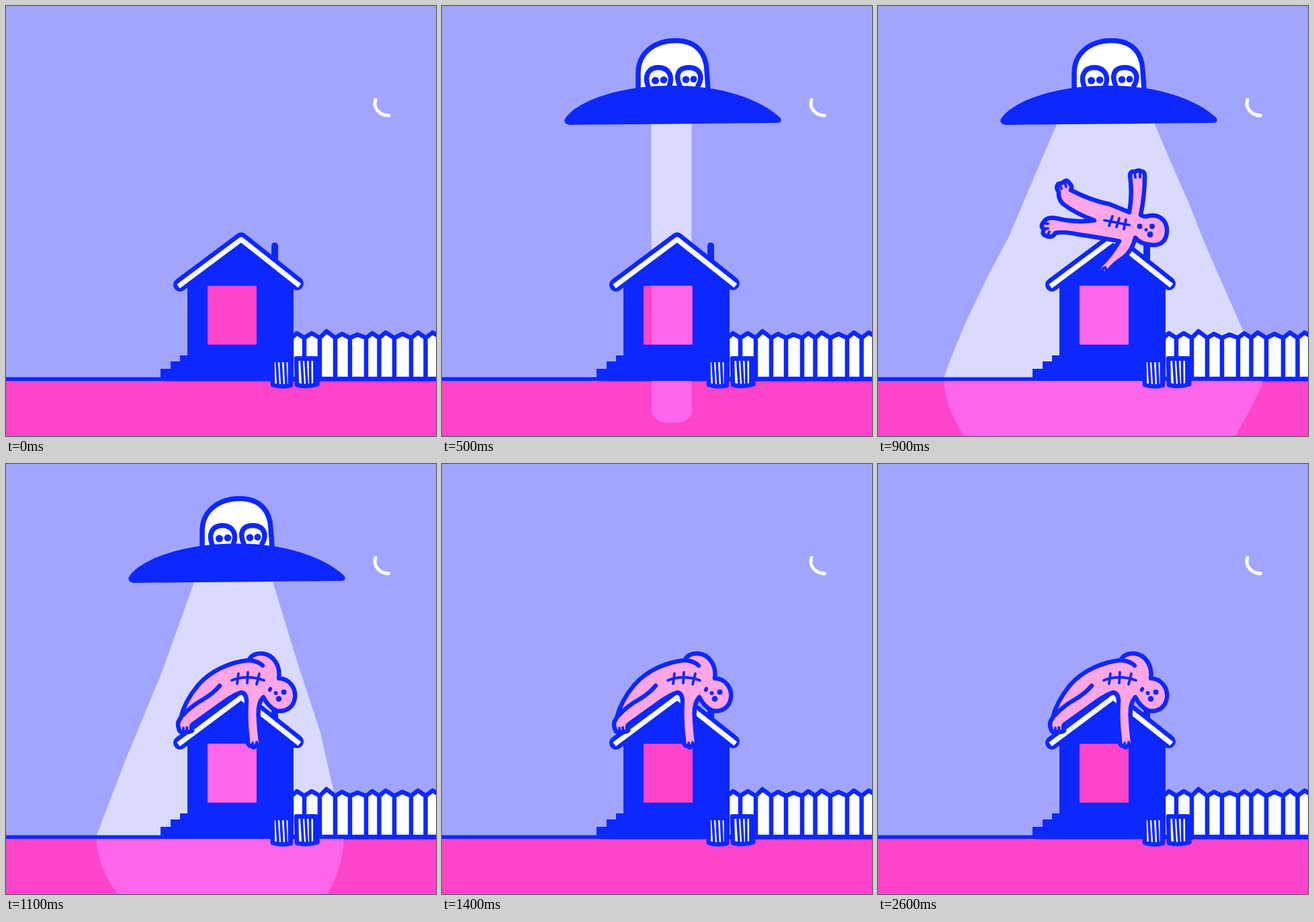
These frames come from a looping animation (640 px wide and 640 px high, 3000 ms). An HTML page:

```html
<!DOCTYPE html>
<html lang="en">
<head>
<meta charset="utf-8">
<title>Night visit</title>
<style>
  html, body { margin: 0; height: 100%; overflow: hidden; background: #a2a5ff; }
  svg { display: block; width: 100vw; height: 100vh; }
  .ink { fill: none; stroke: #0d27ff; stroke-width: 6.5; stroke-linecap: round; stroke-linejoin: round; }
  .solid { fill: #0d27ff; }
  .white { fill: #fff; }
  .skin { fill: #ffa6e6; }
  .thin { stroke-width: 3.8; }
</style>
</head>
<body>
<svg viewBox="0 0 640 640">
  <defs>
    <clipPath id="lit"><path d="M0 558H640V640H0ZM300 416.500H373V504H300Z"/></clipPath>
  </defs>
  <rect width="640" height="640" fill="#a2a5ff"/>
  <path d="M550 139.500C546 152 556 163 569.500 163" fill="none" stroke="#fff" stroke-width="5" stroke-linecap="round"/>
  <path class="beam" fill="#dadaff"/>

  <rect y="556" width="640" height="84" fill="#ff44cc"/>
  <path class="ink white" id="fence"/>
  <path class="ink" d="M-5 555.300H230L240 555.800H645" style="stroke-width:5.500"/>

  <!-- house -->
  <path class="solid" d="M270 410L350 348L428 410V558H230V540H245V529H259V520H270Z"/>
  <path class="ink thin" d="M232 555V542H247V531H261V522H272"/>
  <path class="ink" d="M400 357V378" style="stroke-width:10"/>
  <path class="ink" d="M259 415L350 347L433 413" style="stroke-width:20"/>
  <path d="M259.500 415L350 347.500L434 414" fill="none" stroke="#fff" stroke-width="7.500" stroke-linecap="square" stroke-linejoin="round"/>
  <rect x="300" y="416.500" width="73" height="87.500" fill="#ff44cc"/>
  <path class="beam" fill="#ff66eb" clip-path="url(#lit)"/>

  <!-- bins -->
  <path class="ink white" d="M396.500 527H424.500L424 564.500Q411 568 397 564Z"/>
  <path class="ink white" d="M432 525H462L463.500 563Q448 568 433 564Z"/>
  <path class="ink thin" d="M403 530L405 563M409 530L411 564M415.500 530L417 564M421.500 530V564M440 529L442 562M446 528L448 563M452.500 528L453 563M459 528V562"/>
  <path class="ink" d="M432 524.500H462"/>

  <g id="falling">
    <path class="ink skin" d="M374 307Q379 280 375 252Q376 245 382 247Q388 243 391 246Q397 245 397 253Q397 282 391 311
      Q396 314 400 313C418 308 431 319 430 336C429 352 418 358 404 355Q390 354 383 345Q378 365 365 375Q352 383 343 394Q338 400 334 396Q327 395 330 387
      Q346 372 359 350Q326 344 298 340Q275 335 264 338Q259 346 250 342Q243 340 247 333Q241 328 246 322Q251 313 266 316Q295 323 322 319
      Q296 310 276 295Q268 288 269 277Q264 270 268 265Q273 264 276 262Q281 257 285 264Q290 268 287 274Q318 290 345 295Z"/>
    <path class="ink thin" d="M337 319L374 326M349 313L344 327M359 316L355 329M369 318L366 332M382 247L383 255M390 247L390 255M270 265L273 272M278 262L280 269M246 323L253 324M246 332L253 331M252 342L255 336M334 396L335 390M340 394L338 389"/>
    <g class="solid">
      <circle cx="389.500" cy="328" r="4"/><circle cx="399" cy="333" r="2.500"/>
      <circle cx="408" cy="328" r="4"/><circle cx="405" cy="340" r="4.500"/>
    </g>
  </g>

  <g id="slumped">
    <path class="ink skin" d="M257 393Q254 385 260 378Q266 353 286 329C305 307 334 295 361 292Q367 281 381 282C398 283 409 301 406 319
      C421 319 432 333 430 348C428 363 415 370 402 367Q390 361 383 347Q374 356 376 379Q377 399 379 413Q379 420 373 418Q369 424 366 420Q359 420 360 411Q356 379 358 354
      Q358 341 350 340Q340 343 326 353L280 386Q274 389 277 397Q273 400 269 398Q266 404 263 399Q258 400 257 393Z"/>
    <path class="ink" d="M263 374Q276 360 294 350Q309 341 318 330M361 292Q375 293 382 300"/>
    <path class="ink thin" d="M336 322Q359 313 384 322M346 312L344 327M360 310L359 326M377 312L373 328M264 399V393M270 398L269 392M367 420V415M373 418V414"/>
    <g class="solid">
      <ellipse cx="393" cy="335.500" rx="2.800" ry="3.800" transform="rotate(25 393 335.500)"/><circle cx="401.500" cy="341" r="3"/>
      <circle cx="413.500" cy="339.500" r="4"/><circle cx="406" cy="349.500" r="4.300"/>
    </g>
  </g>

  <g id="ufo">
    <path class="ink white" style="stroke-width:7.500" d="M292 124V100C292 70 316 51.500 348 51.500C380 51.500 393 72 394 95L396 124"/>
    <path class="ink" style="stroke-width:7.500" d="M307 120C301 105 306 92 322 91.500C339 92 344 106 338 120M354 119C347 103 351 92 367 91.500C385 92 389 106 381 119"/>
    <g class="solid">
      <circle cx="317.500" cy="111" r="5.500"/><circle cx="330" cy="110" r="5.300"/>
      <circle cx="363" cy="109.500" r="5.300"/><circle cx="374.500" cy="109" r="5"/>
      <path d="M183 168C201 141 266 118 343 118.500C412 118 473 137 504 167Q507 174 498 174C400 175 280 176 190 177Q180 175 183 168Z"/>
    </g>
  </g>

  <g id="bubble">
    <path class="ink white" style="stroke-width:6" d="M464 322C446 319 435 311 435 297C436 280 455 270 482 270C505 270 517 282 516 298C514 316 498 323 471 323C468 334 458 341 447 342C457 337 463 330 464 322Z"/>
    <path class="ink" role="img" aria-label="WTF" style="stroke-width:4.600" d="M450 295L454 312L461 300L466 311L471 293M475 292L489 290M482 292L481 308M494 291L492 306M494 291L505 290M493 299L502 297"/>
  </g>
</svg>
<script>
const $ = id => document.getElementById(id);
const beams = document.querySelectorAll(".beam");

const beamShapes = {
  none: "",
  narrow: "M311.500 165H371.500V597Q375 600 371 605Q369 620 345 620.500Q315 622 312 602Z",
  mid: "M284 165H394L432 290L468 400L503 555Q502 600 478 640H166Q136 600 134 555L178 440L232 310Z",
  wide: "M271 165H407L411 174L437 235L462 292L485 350L512 412L545 487L571 555Q573 562 570 568L551 606L532 640H128Q99 595 98 555L105 533L130 472L162 405L195 343L230 260L267 174Z"
};
// One entry per 100 ms step.
const beamSteps = { 5: "narrow", 6: "mid", 7: "wide", 8: "wide", 9: "wide", 10: "wide", 11: "mid", 12: "narrow" };
const ufoSteps = { 1: -130, 2: -78, 3: -30, 4: 0, 12: -3, 13: -80 };

const peaks = [[433, 487], [455, 487], [477, 484], [500, 488], [523, 489], [545, 487], [565, 486], [590, 488], [613, 486], [635, 486]];
const gaps = [444, 467, 490, 512, 536, 555.5, 578, 603, 624.5, 648];
$("fence").setAttribute("d", "M425 494" +
  peaks.map(([x, y], i) => `L${x} ${y}L${gaps[i]} 494`).join("") + "V555H425Z" +
  gaps.map(x => `M${x} 494V555`).join(""));

const show = (id, on) => $(id).style.display = on ? "" : "none";

function draw(now) {
  const step = Math.floor(now % 3000 / 100);
  const beam = beamShapes[beamSteps[step] || "none"];
  beams.forEach(b => b.setAttribute("d", beam));
  show("ufo", step > 0 && step < 14);
  $("ufo").setAttribute("transform", `translate(0 ${ufoSteps[step] || 0})`);
  show("falling", step === 8 || step === 9);
  $("falling").setAttribute("transform", step === 8 ? "translate(0 -90) rotate(-20 340 320)" : "");
  show("slumped", step >= 10);
  show("bubble", step >= 17 && step < 26);
}

const start = performance.now();
function tick() {
  draw(performance.now() - start);
  requestAnimationFrame(tick);
}
tick();
</script>
</body>
</html>
```
